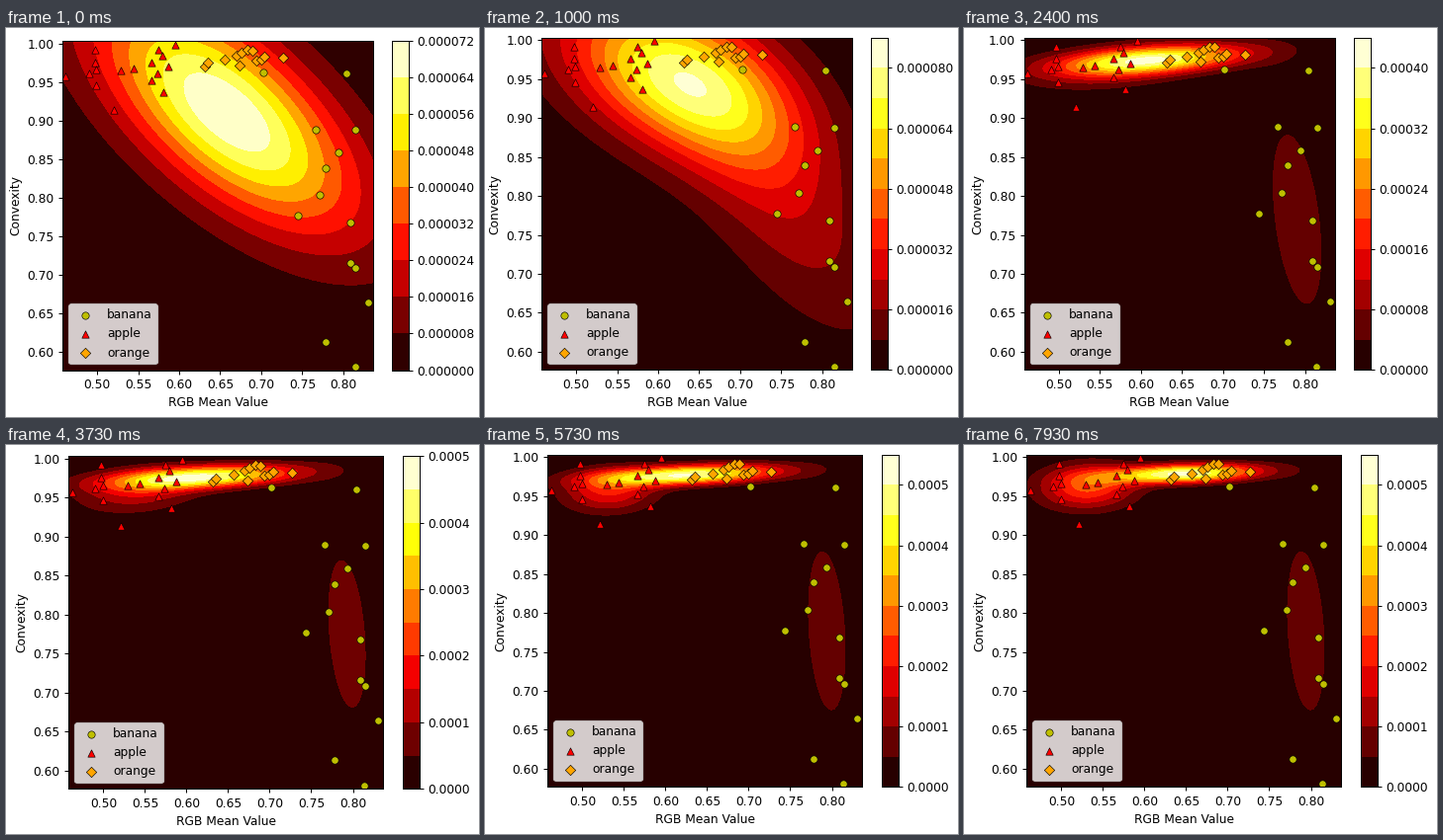
Animation of 478 by 394 pixels, one loop 8 s. Source, as a matplotlib script:

```python
import numpy as np
import matplotlib.pyplot as plt
from matplotlib.animation import FuncAnimation

W, H, DPI = 478, 394, 80
FRAMES, LOOP = 120, 8000
PT = 1.1  # scale of all point sizes
XLIM, YLIM = (0.4578, 0.8363), (0.5764, 1.0033)
CELL = 0.002 ** 2  # densities are shown as probability per cell

plt.rcParams.update({
    "font.family": "DejaVu Sans", "font.size": 10 * PT,
    "axes.linewidth": 0.8 * PT, "axes.labelpad": 4 * PT,
    "patch.linewidth": 1.0 * PT,
})
for side in ("xtick", "ytick"):
    plt.rcParams.update({f"{side}.major.size": 3.5 * PT,
                         f"{side}.major.width": 0.8 * PT,
                         f"{side}.major.pad": 3.5 * PT})

FRUITS = {
    "banana": ("o", "y", [
        (.702, .963), (.804, .961), (.766, .889), (.815, .888), (.794, .859),
        (.778, .839), (.771, .804), (.744, .777), (.809, .768), (.809, .716),
        (.815, .709), (.830, .664), (.778, .613), (.814, .581)]),
    "apple": ("^", "red", [
        (.462, .957), (.490, .962), (.497, .992), (.497, .976), (.499, .966),
        (.499, .946), (.521, .914), (.529, .965), (.544, .968), (.566, .976),
        (.566, .952), (.573, .962), (.575, .992), (.579, .984), (.581, .937),
        (.587, .970), (.595, .999)]),
    "orange": ("D", "orange", [
        (.631, .971), (.635, .975), (.656, .979), (.670, .984), (.673, .972),
        (.676, .988), (.683, .992), (.689, .991), (.694, .978), (.700, .979),
        (.704, .983), (.727, .982)]),
}


def pose(w, mx, my, sx, sy, rho):
    """Weight, mean and covariance of one mixture component."""
    c = rho * sx * sy
    return w, np.array([mx, my]), np.array([[sx * sx, c], [c, sy * sy]])


def blend(a, b, p):
    """Moments of a population that is part a, part b."""
    d = b[1] - a[1]
    return (a[0] + p * (b[0] - a[0]), a[1] + p * d,
            (1 - p) * a[2] + p * b[2] + p * (1 - p) * np.outer(d, d))


# One broad cloud splits into three components, which then settle slowly.
# Order in each stage: banana, apple, orange.
START = [pose(1 / 3, .658, .911, .110, .107, -.655)] * 3
SPLIT = [pose(.31, .787, .764, .034, .113, -.52),
         pose(.17, .592, .971, .078, .0165, .35),
         pose(.52, .612, .974, .083, .0155, .45)]
NARROW = [pose(.30, .794, .777, .0235, .108, -.25),
          pose(.20, .533, .955, .038, .018, .08),
          pose(.50, .622, .9768, .075, .0089, .37)]
SETTLED = [NARROW[0],
           pose(.315, .531, .9625, .0395, .0195, .05),
           pose(.385, .648, .979, .060, .0081, .25)]
T_SPLIT, T_NARROW, T_END = 19.5, 74, FRAMES - 1


def mixture(i):
    if i < T_SPLIT:
        a, b, p = START, SPLIT, (i / T_SPLIT) ** 1.7
    elif i < T_NARROW:
        u = (i - T_SPLIT) / (T_NARROW - T_SPLIT)
        a, b, p = SPLIT, NARROW, np.sin(u * np.pi / 2)
    else:
        a, b, p = NARROW, SETTLED, (i - T_NARROW) / (T_END - T_NARROW)
    return [blend(s, e, p) for s, e in zip(a, b)]


X, Y = np.meshgrid(np.linspace(*XLIM, 115), np.linspace(*YLIM, 215))


def density(w, mean, cov):
    dx, dy = X - mean[0], Y - mean[1]
    det = np.linalg.det(cov)
    q = (cov[1, 1] * dx ** 2 - 2 * cov[0, 1] * dx * dy
         + cov[0, 0] * dy ** 2) / det
    return w * np.exp(-q / 2) / (2 * np.pi * np.sqrt(det))


def decimals(ticks):
    for d in (4, 5):
        scaled = ticks * 10 ** d
        if np.allclose(scaled, np.round(scaled), atol=1e-3):
            return d
    return 6


def place(axes, left, right, top, bottom):
    axes.set_position([left / W, 1 - bottom / H,
                       (right - left) / W, (bottom - top) / H])


def arrange(digits, full):
    """Fit both axes to the width and the top of the colour bar labels."""
    left = {4: 63, 5: 60.8, 6: 57}[digits]
    width = 318 if digits == 4 else 314.1
    top, bottom = (13.3, 346.5) if full else (9.8, 346.4)
    if full and digits == 4:
        top, bottom = 11.2, 348.2
    bar = left + width + (20 if digits == 4 else 19.2)
    place(ax, left, left + width, top, bottom)
    place(cax, bar, bar + 16.8, top, bottom)


fig = plt.figure(figsize=(W / DPI, H / DPI), dpi=DPI, facecolor="white")
ax = fig.add_axes([0.1, 0.1, 0.6, 0.8])
cax = fig.add_axes([0.8, 0.1, 0.05, 0.8])

ax.set_xlim(*XLIM)
ax.set_ylim(*YLIM)
xt, yt = np.arange(0.5, 0.81, 0.05), np.arange(0.6, 1.001, 0.05)
ax.set_xticks(xt, [f"{v:.2f}" for v in xt])
ax.set_yticks(yt, [f"{v:.2f}" for v in yt])
ax.set_xlabel("RGB Mean Value")
ax.set_ylabel("Convexity")
for name, (marker, color, pts) in FRUITS.items():
    ax.scatter(*np.transpose(pts), s=36 * PT ** 2, marker=marker, c=color,
               edgecolors="black", linewidths=0.5 * PT, label=name, zorder=2)
ax.legend(loc="lower left")

shown = {}


def draw_bar(levels):
    ticks = levels[::1 if len(levels) <= 10 else 2]
    digits = decimals(ticks)
    mids = (levels[1:] + levels[:-1]) / 2
    cax.cla()
    cax.pcolormesh([0, 1], levels, mids[:, None], cmap="hot",
                   vmin=levels[0], vmax=levels[-1])
    cax.set_xlim(0, 1)
    cax.set_ylim(levels[0], levels[-1])
    cax.set_xticks([])
    cax.yaxis.tick_right()
    cax.set_yticks(ticks, [f"{v:.{digits}f}" for v in ticks])
    arrange(digits, ticks[-1] == levels[-1])


def update(i):
    if "field" in shown:
        shown.pop("field").remove()
    z = CELL * sum(density(*part) for part in mixture(i))
    field = ax.contourf(X, Y, z, 10, cmap="hot", zorder=1)
    shown["field"] = field
    draw_bar(np.asarray(field.levels))
    return [field]


anim = FuncAnimation(fig, update, frames=FRAMES, interval=LOOP / FRAMES,
                     init_func=lambda: [], repeat=True, repeat_delay=0,
                     blit=False)
plt.show()
```
